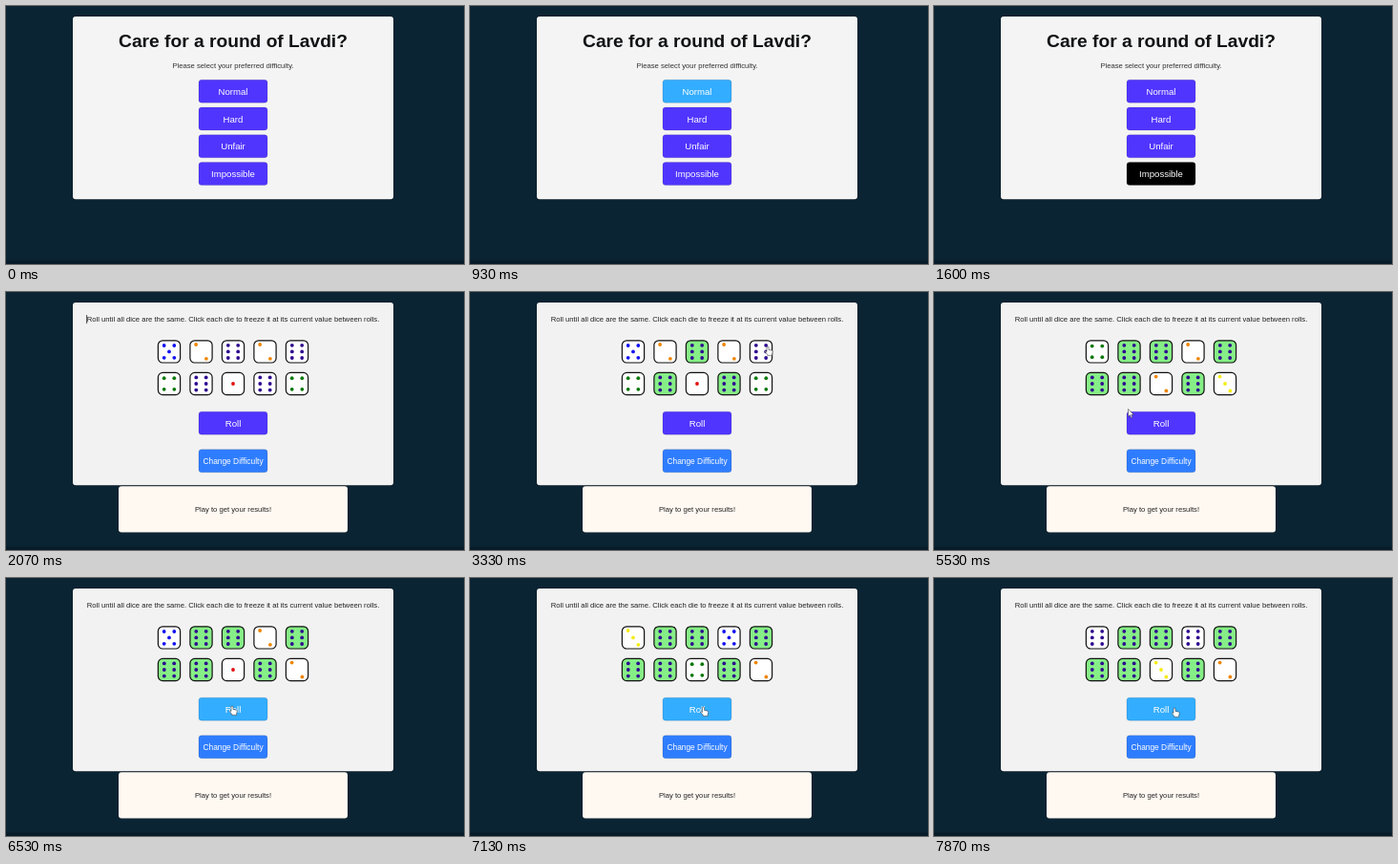
An HTML page for the animation above (8 s loop, 480 by 270 pixels).

```html
<!DOCTYPE html>
<html lang="en">
<head>
<meta charset="utf-8">
<title>Dice round</title>
<style>
  html, body { margin: 0; width: 100%; height: 100%; overflow: hidden; background: #0b2434; }
  svg { display: block; width: 480px; height: 270px; }
  text { font-family: "Liberation Sans", Arial, sans-serif; text-anchor: middle; }
</style>
</head>
<body>
<svg id="stage" viewBox="0 0 480 270"></svg>
<script>
const LOOP = 8000;
const NS = "http://www.w3.org/2000/svg";
const stage = document.getElementById("stage");

function add(parent, tag, attrs, content) {
  const node = document.createElementNS(NS, tag);
  for (const key in attrs) node.setAttribute(key, attrs[key]);
  if (content) node.textContent = content;
  parent.appendChild(node);
  return node;
}

const box = (parent, x, y, width, height, rx, fill) =>
  add(parent, "rect", { x, y, width, height, rx, fill });

const label = (parent, x, y, size, fill, content, weight = 400) =>
  add(parent, "text", { x, y, "font-size": size, fill, "font-weight": weight }, content);

function button(parent, y, content, fill, size = 9.6) {
  const face = box(parent, 202, y, 72, 24, 3, fill);
  face.setAttribute("stroke", "rgba(0,0,0,.2)");
  face.setAttribute("stroke-width", 0.6);
  label(parent, 238, y + 12 + size * 0.36, size, "#fff", content);
  return face;
}

function show(node, visible) {
  node.setAttribute("visibility", visible ? "visible" : "hidden");
}

// Page and the two screens
box(stage, 0, 0, 480, 270, 0, "#0b2434");
box(stage, 0, 266.5, 480, 4, 0, "#071b29");
box(stage, 69.5, 10.5, 337, 192.5, 3.5, "#061722");
const card = box(stage, 70, 11, 336, 191.3, 3, "#f4f4f4");

const menu = add(stage, "g", {});
label(menu, 238, 43, 19.2, "#101214", "Care for a round of Lavdi?", 700);
label(menu, 238, 64.7, 7.68, "#333", "Please select your preferred difficulty.");
const PURPLE = "#5035ff";
const SKY = "#33adff";
const levels = [
  { name: "Normal", hover: SKY, from: 930, to: 1130 },
  { name: "Hard", hover: "#f08a00", from: 1130, to: 1400 },
  { name: "Unfair", hover: "#e02020", from: 1400, to: 1600 },
  { name: "Impossible", hover: "#000", from: 1600, to: 1800 }
];
levels.forEach((level, i) => {
  level.face = button(menu, 77.3 + i * 28.75, level.name, PURPLE);
});

const game = add(stage, "g", {});
label(game, 238, 31.2, 7.68, "#222",
  "Roll until all dice are the same. Click each die to freeze it at its current value between rolls.");
const caret = box(game, 84.3, 24, 0.8, 9, 0, "#222");
const rollFace = button(game, 125.2, "Roll", PURPLE);
button(game, 164.7, "Change Difficulty", "#2f7dff", 8.4);
box(game, 117.5, 202.8, 241, 49.2, 3.5, "#061722");
box(game, 118, 203.3, 240, 48.2, 3, "#fff9f2");
label(game, 238, 229.8, 7.68, "#222", "Play to get your results!");

// Dice
const pipColors = ["", "#e01010", "#ee8600", "#f4ec18", "#0a780a", "#1414f0", "#2f0a90"];
const mirror = (x, y) => [[-x, -y], [x, y]];
const corners = (x, y) => [...mirror(x, y), ...mirror(-x, y)];
const pips = [
  [],
  [[0, 0]],
  mirror(5.4, 7.4),
  [...mirror(5.4, 7.4), [0, 0]],
  corners(5.3, 5.8),
  [...corners(5.3, 6.4), [0, 0]],
  [...corners(5.2, 6.6), ...mirror(5.2, 0)]
];
const dice = Array.from({ length: 10 }, (_, i) => {
  const x = 171 + (i % 5) * 33.5;
  const y = i < 5 ? 62.4 : 96;
  const group = add(game, "g", { transform: `translate(${x} ${y})` });
  const face = add(group, "rect", {
    x: -11.6, y: -11.6, width: 23.2, height: 23.2, rx: 4.8, stroke: "#111", "stroke-width": 1.2
  });
  const faces = pips.map((spots, value) => {
    const layer = add(group, "g", { fill: pipColors[value] });
    spots.forEach(([cx, cy]) => add(layer, "circle", { cx, cy, r: 1.9 }));
    return layer;
  });
  return { x, y, face, faces };
});

const rolls = [
  [0, "5262646164"], [3870, "3165626465"], [4070, "2464616361"], [4530, "4662666263"],
  [5870, "1664666465"], [6070, "5662666162"], [6730, "3665666462"], [7670, "6666666362"]
];
const freezeTimes = { 6: 2670, 2: 2970, 8: 3170, 4: 3470, 1: 4970, 5: 5290 };

// Pointer: time, x, y of the tip
const path = [
  [2130, 190, 124], [2500, 203, 94], [2700, 203, 94], [2900, 237, 60], [2990, 237, 60],
  [3130, 270, 94], [3190, 270, 94], [3330, 312, 57], [3500, 312, 57], [3780, 237, 134],
  [4600, 237, 134], [4900, 204, 60], [5000, 204, 60], [5240, 170, 94], [5310, 170, 94],
  [5530, 203.5, 122.5], [5700, 237, 134], [6730, 237, 134], [7530, 252, 136]
];
const pointer = add(game, "g", { stroke: "#222", "stroke-width": 0.5, fill: "#fff", "stroke-linejoin": "round" });
const arrow = add(pointer, "path", { d: "M0 0V8L1.9 6.3L3.2 9.2L4.5 8.6L3.2 5.9H5.8Z" });
const hand = add(pointer, "path", {
  d: "M-1 .5Q0-.6 1 .5V3.4L4.6 4.2Q5.4 4.5 5.2 5.6L4.6 8.2V9.4H-.3V8.4L-2.8 5.4Q-2.6 4.2-1 5.5Z"
});

function pointerAt(t) {
  const next = path.findIndex(point => point[0] > t);
  if (next < 1) return path[next < 0 ? path.length - 1 : 0].slice(1);
  const [t0, x0, y0] = path[next - 1];
  const [t1, x1, y1] = path[next];
  const k = (t - t0) / (t1 - t0);
  const ease = k * k * (3 - 2 * k);
  return [x0 + (x1 - x0) * ease, y0 + (y1 - y0) * ease];
}

function draw(t) {
  const playing = t >= 1800;
  menu.style.display = playing ? "none" : "";
  game.style.display = playing ? "" : "none";
  card.setAttribute("fill", playing ? "#f2f2f2" : "#f4f4f4");
  for (const level of levels) {
    level.face.setAttribute("fill", t >= level.from && t < level.to ? level.hover : PURPLE);
  }

  const values = rolls.filter(([start]) => start <= t).pop()[1];
  dice.forEach((die, i) => {
    die.face.setAttribute("fill", t >= freezeTimes[i] ? "#86ee86" : "#fff");
    die.faces.forEach((layer, value) => show(layer, value === +values[i]));
  });

  const [x, y] = pointerAt(t);
  const overRoll = t >= 2130 && x > 202 && x < 274 && y > 125 && y < 149;
  const overDie = dice.some(die => Math.abs(x - die.x) < 12 && Math.abs(y - die.y) < 12);
  rollFace.setAttribute("fill", overRoll ? SKY : PURPLE);
  pointer.setAttribute("transform", `translate(${x} ${y})`);
  pointer.style.display = t >= 2130 ? "" : "none";
  show(hand, overRoll || overDie);
  show(arrow, !overRoll && !overDie);
  show(caret, t < 2300);
}

function tick() {
  draw(performance.now() % LOOP);
  requestAnimationFrame(tick);
}
tick();
</script>
</body>
</html>
```
